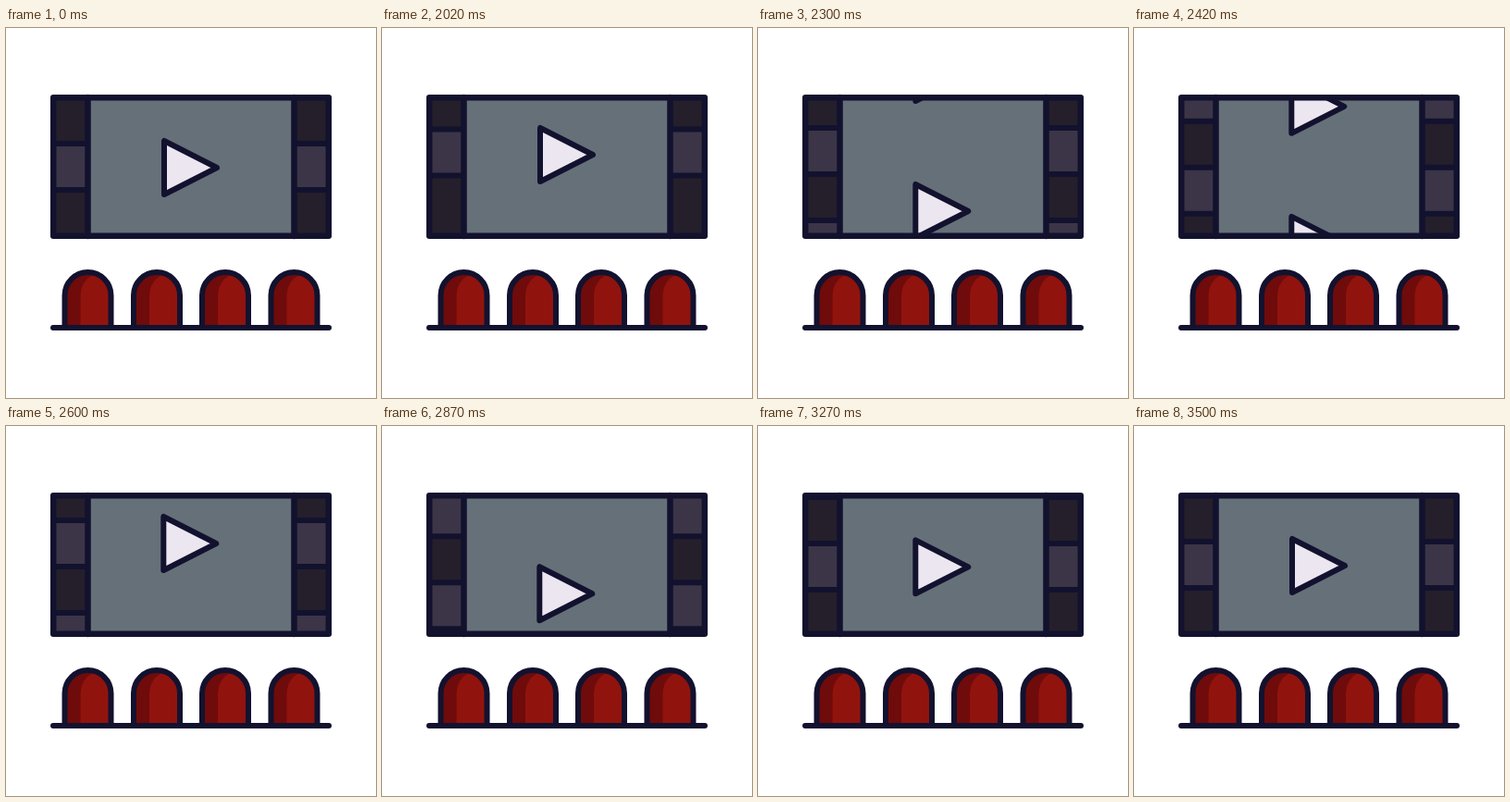
These frames come from a looping animation (400x400 px, 3520 ms). An HTML page with a canvas:

```html
<!DOCTYPE html>
<html>
<head>
<meta charset="utf-8">
<style>
html, body { margin: 0; width: 100%; height: 100%; overflow: hidden; background: #fff; }
canvas { display: block; }
</style>
</head>
<body>
<canvas id="stage" width="400" height="400"></canvas>
<script>
const ctx = document.getElementById('stage').getContext('2d');
const INK = '#12122f', DARK = '#251f2b', LIGHT = '#3b3547';
const LOOP = 3520, START = 2020, STEPS = 60;
const ICON_PITCH = 148, BLOCK = 50;

// Distance still to scroll at a few animation steps
const keys = [0, 1, 5, 12, 24, 42, 60];
const iconLeft = [740, 726, 622, 343, 124, 5, 0];
const stripLeft = [1020, 1004.5, 857, 483, 177, 8, 0];

// Monotone cubic through the key values
function curve(values, k) {
  const last = keys.length - 1;
  const slope = i => (values[i + 1] - values[i]) / (keys[i + 1] - keys[i]);
  const tangent = i => {
    if (i === 0) return slope(0);
    if (i === last) return 0;
    const a = slope(i - 1), b = slope(i);
    return 2 * a * b / (a + b);
  };
  let i = 0;
  while (i < last - 1 && k > keys[i + 1]) i++;
  const h = keys[i + 1] - keys[i], s = (k - keys[i]) / h, r = 1 - s;
  return values[i] * r * r * (1 + 2 * s) + values[i + 1] * s * s * (3 - 2 * s)
    + h * s * r * (r * tangent(i) - s * tangent(i + 1));
}

function stepAt(time) {
  const d = time - START;
  if (d < 0) return 0;
  return Math.min(STEPS, 1 + 2 * Math.floor(d / 50) + (d % 50 >= 30 ? 1 : 0));
}

function line(x1, y1, x2, y2) {
  ctx.beginPath();
  ctx.moveTo(x1, y1);
  ctx.lineTo(x2, y2);
  ctx.stroke();
}

function block(x, top, bottom, color) {
  ctx.fillStyle = color;
  ctx.fillRect(x, top, 37, bottom - top);
  line(x, top, x + 37, top);
}

function strip(x, left) {
  const base = 125 + left % (2 * BLOCK) - 4 * BLOCK;
  for (let i = 0; i < 7; i++) {
    const y = base + i * BLOCK;
    block(x, y, y + BLOCK, i % 2 ? DARK : LIGHT);
  }
  // Opening piece with a longer last block
  const y = left - stripLeft[0];
  if (y + 253 > 70) {
    block(x, y + 75, y + 125, DARK);
    block(x, y + 125, y + 175, LIGHT);
    block(x, y + 175, y + 253, DARK);
    line(x, y + 253, x + 37, y + 253);
  }
}

function icon(x, y) {
  ctx.beginPath();
  ctx.moveTo(x, y - 29);
  ctx.lineTo(x, y + 29);
  ctx.lineTo(x + 57, y);
  ctx.closePath();
  ctx.fillStyle = '#ebe6ef';
  ctx.fill();
  ctx.stroke();
}

function seatPath(x) {
  ctx.beginPath();
  ctx.moveTo(x - 25, 324);
  ctx.lineTo(x - 25, 289);
  ctx.arc(x, 289, 25, Math.PI, 0);
  ctx.lineTo(x + 25, 324);
}

function seat(x) {
  ctx.save();
  seatPath(x);
  ctx.clip();
  ctx.fillStyle = '#6f0b0b';
  ctx.fillRect(x - 26, 260, 52, 64);
  seatPath(x + 17);
  ctx.fillStyle = '#91130d';
  ctx.fill();
  ctx.restore();
  seatPath(x);
  ctx.stroke();
}

function draw(time) {
  const k = stepAt(time);
  const toGo = curve(iconLeft, k), stripToGo = curve(stripLeft, k);
  ctx.fillStyle = '#fff';
  ctx.fillRect(0, 0, 400, 400);
  ctx.strokeStyle = INK;
  ctx.lineWidth = 6;
  ctx.lineJoin = ctx.lineCap = 'round';

  ctx.save();
  ctx.beginPath();
  ctx.rect(51, 75, 298, 150);
  ctx.clip();
  ctx.fillStyle = '#667079';
  ctx.fillRect(51, 75, 298, 150);
  for (let n = 0; n <= 5; n++) {
    const y = 151 + toGo - n * ICON_PITCH;
    if (y > 30 && y < 270) icon(n === 5 || k === STEPS ? 171 : 170.3, y);
  }
  strip(51, stripToGo);
  strip(312, stripToGo);
  ctx.restore();

  ctx.lineWidth = 6.5;
  line(88.5, 75, 88.5, 225);
  line(311.5, 75, 311.5, 225);
  ctx.strokeRect(51.2, 75.2, 297.6, 149.6);

  ctx.lineWidth = 6;
  for (const x of [88.5, 163, 237, 311.5]) seat(x);
  line(51, 324, 349, 324);
}

function tick() {
  draw(performance.now() % LOOP);
  requestAnimationFrame(tick);
}
tick();
</script>
</body>
</html>
```
